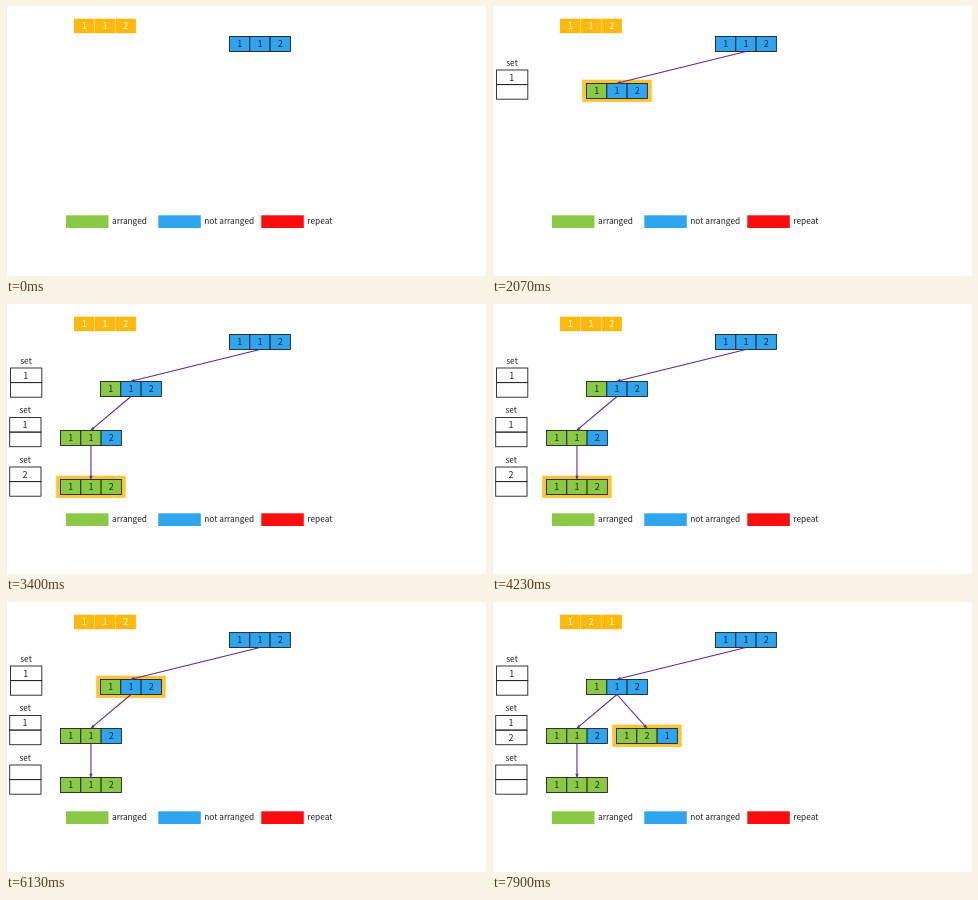
Animation, 480 px wide and 270 px high, one loop 8 s. Source, as an HTML page with a canvas:

```html
<!DOCTYPE html>
<html lang="en">
<head>
<meta charset="utf-8">
<title>Permutations without repeats</title>
<style>
html, body { margin: 0; width: 100%; height: 100%; overflow: hidden; background: #fefefe; }
canvas { display: block; width: 480px; height: 270px; }
</style>
</head>
<body>
<canvas id="stage"></canvas>
<script>
const DURATION = 8000;
const GREEN = '#8ac945', BLUE = '#2fa5f0', RED = '#f90d0d';
const YELLOW = '#ffb90d', GLOW = '#fdc436', INK = '#222', PURPLE = '#5b2b9b';
const FONT = '"Noto Sans CJK SC", "Noto Sans", sans-serif';
const CELL = 20.3, HEIGHT = 15;

const canvas = document.getElementById('stage');
const ctx = canvas.getContext('2d');
const ratio = window.devicePixelRatio || 1;
canvas.width = 480 * ratio;
canvas.height = 270 * ratio;
ctx.scale(ratio, ratio);

const nodes = {
  root:   { x: 223.5, y: 30.5,  digits: '112', arranged: 0, from: 0 },
  first:  { x: 94.5,  y: 77.5,  digits: '112', arranged: 1, from: 1150, parent: 'root' },
  second: { x: 54.5,  y: 126.5, digits: '112', arranged: 2, from: 2350, parent: 'first' },
  leaf:   { x: 54.5,  y: 175.5, digits: '112', arranged: 3, from: 2950, parent: 'second' },
  other:  { x: 124.5, y: 126.5, digits: '121', arranged: 2, from: 6550, parent: 'first' }
};

const sets = [
  { x: 4.5, y: 64,    from: 900,  entries: [{ digit: 1, from: 1550 }] },
  { x: 3.7, y: 113.5, from: 2150, entries: [{ digit: 1, from: 2550 }, { digit: 2, from: 7500 }] },
  { x: 3.7, y: 163,   from: 2750, entries: [{ digit: 2, from: 3150, to: 4300 }] }
];

// Which node is being visited, from when on.
const visits = [[500, 'root'], [1150, 'first'], [2350, 'second'], [2950, 'leaf'],
  [4300, 'second'], [5450, 'first'], [6550, 'other']];

const clamp = v => Math.max(0, Math.min(1, v));
const progress = (t, start, length) => clamp((t - start) / length);
const smooth = p => p * p * (3 - 2 * p);

function box(x, y, w, h, fill) {
  ctx.fillStyle = fill;
  ctx.fillRect(x, y, w, h);
}

function outline(x, y, w, h) {
  ctx.strokeStyle = INK;
  ctx.lineWidth = 0.9;
  ctx.strokeRect(x, y, w, h);
}

function label(text, x, baseline, color = INK, size = 9, align = 'center') {
  ctx.font = `${size}px ${FONT}`;
  ctx.textAlign = align;
  ctx.fillStyle = color;
  ctx.fillText(text, x, baseline);
}

function drawNode({ x, y, digits, arranged }) {
  [...digits].forEach((digit, i) => {
    const left = x + i * CELL;
    box(left, y, CELL, HEIGHT, i < arranged ? GREEN : BLUE);
    outline(left, y, CELL, HEIGHT);
    label(digit, left + CELL / 2, y + 10.8);
  });
}

function drawArrow(parent, child, p) {
  const x0 = parent.x + CELL * 1.5, y0 = parent.y + HEIGHT;
  const x1 = child.x + CELL * 1.5, y1 = child.y - 0.3;
  const x = x0 + (x1 - x0) * p, y = y0 + (y1 - y0) * p;
  ctx.strokeStyle = ctx.fillStyle = PURPLE;
  ctx.lineWidth = 1.1;
  ctx.beginPath();
  ctx.moveTo(x0, y0);
  ctx.lineTo(x, y);
  ctx.stroke();
  ctx.save();
  ctx.translate(x, y);
  ctx.rotate(Math.atan2(y1 - y0, x1 - x0));
  ctx.beginPath();
  ctx.moveTo(0, 0);
  ctx.lineTo(-3.5, -1.7);
  ctx.lineTo(-3.5, 1.7);
  ctx.fill();
  ctx.restore();
}

function drawTree(t) {
  const visit = visits.filter(([from]) => t >= from).pop();
  if (visit) {
    const { x, y } = nodes[visit[1]];
    box(x - 4.3, y - 3.8, CELL * 3 + 8.6, HEIGHT + 7.2, GLOW);
  }
  const all = Object.values(nodes);
  for (const node of all) if (t >= node.from) drawNode(node);
  for (const node of all) {
    const p = smooth(progress(t, node.from - 250, 250));
    if (node.parent && p > 0) drawArrow(nodes[node.parent], node, p);
  }
}

function drawSet({ x, y, from, entries }, t) {
  if (t < from) return;
  label('set', x + 15.5, y - 4.2, INK, 8.3);
  outline(x, y, 31.3, 14.6);
  outline(x, y + 14.6, 31.3, 14.6);
  entries.forEach(({ digit, from, to = DURATION }, i) => {
    if (t >= from && t < to) label(digit, x + 15.3, y + 10.7 + i * 14.6);
  });
}

function drawCurrentOrder(t) {
  const p = progress(t, 6680, 640);
  const shift = 20.7 * smooth(p), lift = 14.5 * Math.sin(Math.PI * p);
  const tile = (digit, x, y) => {
    box(x, y, 20.4, 14.5, YELLOW);
    label(digit, x + 10.2, y + 10.5, '#fff');
  };
  tile(1, 68, 12.7);
  tile(1, 88.8 + shift, 12.7 + lift);
  tile(2, 109.5 - shift, 12.7 - lift);
}

function drawLegend() {
  [[60, GREEN, 'arranged'], [152.3, BLUE, 'not arranged'], [255.3, RED, 'repeat']]
    .forEach(([x, color, text]) => {
      box(x, 209.3, 42.5, 12.7, color);
      label(text, x + 46, 218.2, INK, 8.3, 'left');
    });
}

function render(t) {
  box(0, 0, 480, 270, '#fefefe');
  box(0, 0, 1, 270, '#efefef');
  drawTree(t);
  sets.forEach(set => drawSet(set, t));
  drawCurrentOrder(t);
  drawLegend();
}

const start = performance.now();
function frame() {
  render((performance.now() - start) % DURATION);
  requestAnimationFrame(frame);
}
frame();
</script>
</body>
</html>
```
